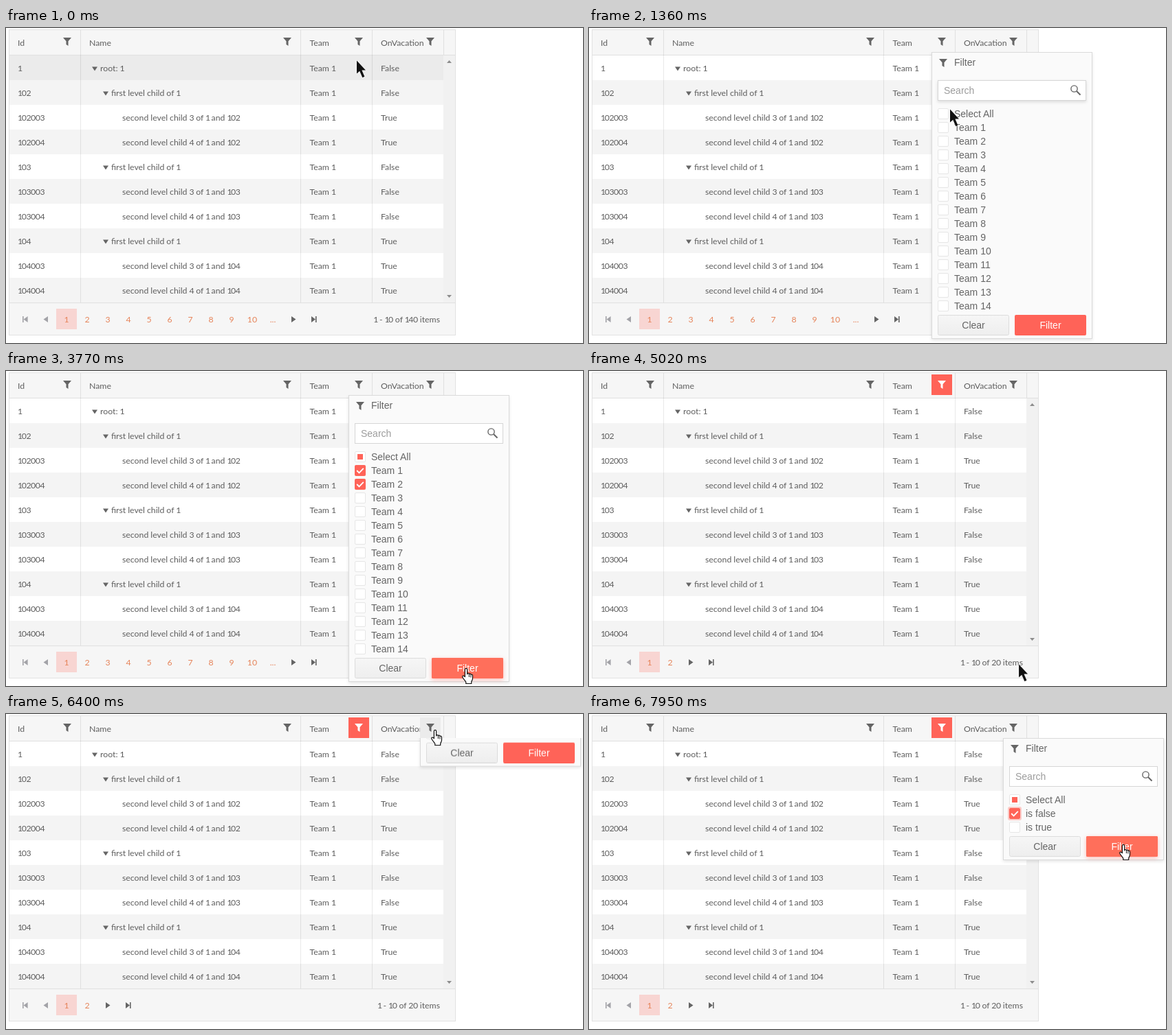
Recreate the animation shown at these times as an HTML page. Size 839 by 459 pixels, loop 8000 ms.

```html
<!DOCTYPE html>
<html lang="en">
<head>
<meta charset="utf-8">
<title>Tree list filtering</title>
<style>
  html, body { margin: 0; width: 100%; height: 100%; overflow: hidden; background: #fff; }
  svg { display: block; width: 839px; height: 459px; }
  text { font: 12.3px Lato, "Open Sans", sans-serif; fill: #5e5e5e; word-spacing: -.2px; }
  .digit { letter-spacing: -.4px; }
  .one { letter-spacing: -1.5px; }
  .ui tspan, .mid tspan { letter-spacing: 0; }
  .mid { text-anchor: middle; }
  .end { text-anchor: end; }
  .link { fill: #e6845a; }
  .ui text { font: 14px "Liberation Sans", Arial, sans-serif; fill: #656565; word-spacing: 0; }
  .ui .hint { fill: #9c9c9c; }
  .light, .ui .light { fill: #fff; }
  .icon { fill: #656565; }
  .off { fill: #a3a3a8; }
  .line { stroke: #000; stroke-opacity: .085; }
  .box { fill: #fff; stroke: #e6e6e6; }
  .red { fill: #ff6358; }
  .panel { fill: #fafafa; stroke: #dadada; filter: drop-shadow(0 2px 2px rgba(0,0,0,.1)); }
  .raised { filter: drop-shadow(0 2px 2px rgba(0,0,0,.12)); }
  .hot { fill: #ff6f5b; filter: drop-shadow(0 2px 3px rgba(255,99,88,.4)); }
  .ring { fill: none; stroke: #ff6358; stroke-opacity: .3; stroke-width: 2; }
</style>
</head>
<body>
<svg id="stage" viewBox="0 0 839 459" xmlns="http://www.w3.org/2000/svg"></svg>
<script>
const LOOP = 8000;
const css = [];

// Keyframes from [ms, declarations] pairs
function animate(id, frames, ease) {
  const body = frames.map(([t, rule]) => `${(t / LOOP * 100).toFixed(3)}%{${rule}}`).join('');
  css.push(`@keyframes ${id}{${body}}#${id}{animation:${id} ${LOOP}ms ${ease} infinite}`);
}

// Hard switch of visibility at each given time
function toggle(id, on, ...times) {
  const frames = [0, ...times].map((t, i) => [t, `opacity:${+(on === (i % 2 === 0))}`]);
  animate(id, frames, 'step-end');
}

const group = (id, body) => `<g id="${id}">${body}</g>`;
const rect = (x, y, w, h, attrs) => `<rect x="${x}" y="${y}" width="${w}" height="${h}" ${attrs}/>`;
const path = (d, attrs) => `<path d="${d}" ${attrs}/>`;
const funnel = (x, y, cls = 'icon') =>
  path(`M${x - 6} ${y - 6}h12l-4.5 5.3v6.7l-3-2v-4.7z`, `class="${cls}"`);

// Digits are set tighter than letters
function text(x, y, str, cls = '') {
  const body = String(str).replace(/\d/g, d => `<tspan class="${d === '1' ? 'one' : 'digit'}">${d}</tspan>`);
  return `<text x="${x}" y="${y}" class="${cls}">${body}</text>`;
}

function table() {
  let out = rect(4.5, 2.5, 649, 445, 'fill="#f6f6f6" stroke="#e2e2e2"');
  for (let i = 0; i < 10; i++) {
    out += rect(5, 40 + 36 * i, 631, 36, `fill="${i % 2 ? '#f4f4f4' : '#fff'}"`);
  }
  out += group('rowHover', rect(5, 40, 631, 36, 'fill="#ebebeb"'));
  out += rect(636, 40, 17, 360, 'fill="#f1f1f1"');
  out += path('M641 51l3.5-4 3.5 4zM641 389l3.5 4 3.5-4z', 'fill="#8c8c8c"');
  out += path('M5 39.5H653M5 400.5H653M108.5 3V400M428.5 3V400M532.5 3V400M636.5 3V39', 'class="line"');

  ['Id', 'Name', 'Team', 'OnVacation'].forEach((s, i) => {
    out += text([17, 121, 441.5, 545][i], 26, s);
  });

  const away = [0, 0, 1, 1, 0, 0, 0, 1, 1, 1];
  for (let i = 0; i < 10; i++) {
    const y = 63 + 36 * i;
    const parent = 102 + Math.floor((i - 1) / 3);
    const kind = (i - 1) % 3;
    let id = parent, name = 'first level child of 1', x = 153;
    if (!i) [id, name, x] = [1, 'root: 1', 137];
    else if (kind) {
      id = `${parent}00${kind + 2}`;
      name = `second level child ${kind + 2} of 1 and ${parent}`;
      x = 169;
    }
    if (x < 169) out += path(`M${x - 12} ${y - 6.5}h8l-4 6z`, 'class="icon"');
    out += text(17, y, id) + text(x, y, name)
      + text(441.5, y, 'Team 1') + text(545, y, away[i] ? 'True' : 'False');
  }

  out += group('iconHover1', rect(498, 5, 30, 30, 'fill="#ebebeb"'));
  out += group('iconHover2', rect(602, 5, 30, 30, 'fill="#ebebeb"'));
  out += [89, 409, 513, 617].map(x => funnel(x, 20)).join('');
  out += group('filtered', rect(498, 5, 30, 30, 'class="red"') + funnel(513, 20, 'light'));
  return out;
}

function pages(id, count, more, total) {
  let out = '';
  for (let n = 2; n <= count; n++) out += text(58 + 30 * n, 429, n, 'mid link');
  if (more) out += text(388, 429, '...', 'mid link');
  const x = 88 + 30 * (count + more);
  out += path(`M${x - 3} 420v9l6.5-4.5zM${x + 26} 420v9l6-4.5zM${x + 32} 420h1.6v9h-1.6z`, 'class="icon"');
  return group(id, out + text(631, 429, `1 - 10 of ${total} items`, 'end'));
}

function pager() {
  return path('M24 420h1.6v9h-1.6zM31.6 420v9l-6-4.5zM61 420v9l-6.5-4.5z', 'class="off"')
    + rect(73, 409, 30, 30, 'fill="#f8d5d2"') + text(88, 429, 1, 'mid link')
    + pages('allPages', 10, 1, 140) + pages('fewPages', 2, 0, 20);
}

// checked: number of items, after the first, that get ticked
function popup(id, x, labels, checked) {
  const foot = 118 + 20 * labels.length;
  let out = rect(x + .5, 35.5, 233, foot - 1, 'class="panel"');
  out += funnel(x + 17, 51) + text(x + 33, 55, 'Filter');
  out += group(id + 'Focus', rect(x + 9, 76, 216, 30, 'class="raised" fill="#fff"'));
  out += rect(x + 9.5, 76.5, 215, 29, 'fill="#fff" stroke="#d6d6d6"') + text(x + 18, 96, 'Search', 'hint');
  out += `<circle cx="${x + 207.5}" cy="88.5" r="4.6" fill="none" stroke="#656565" stroke-width="1.4"/>`;
  out += path(`M${x + 211} 92l5.5 5.5`, 'stroke="#656565" stroke-width="2"');

  labels.forEach((label, i) => {
    const left = x + 9, top = 117 + 20 * i;
    out += rect(left + .5, top + .5, 15, 15, 'class="box" rx="1.5"') + text(x + 33, top + 13, label);
    if (!i) out += group(id + 'Some', rect(left + 4, top + 4, 8, 8, 'class="red"'));
    else if (i <= checked) {
      out += group(id + 'Tick' + i, rect(left, top, 16, 16, 'class="red" rx="2"')
        + path(`M${left + 3.2} ${top + 8}l3.3 3.4 6.3-6.6`, 'fill="none" stroke="#fff" stroke-width="1.8"'));
    }
  });
  const last = 117 + 20 * checked;
  out += group(id + 'Ring', rect(x + 8, last - 1, 18, 18, 'class="ring" rx="2"'));

  out += rect(x + 9.5, foot + .5, 103, 29, 'fill="url(#grey)" stroke="#dcdcdc" rx="2"') + text(x + 61, foot + 20, 'Clear', 'mid');
  out += rect(x + 121, foot, 104, 30, 'class="red" rx="2"');
  out += group(id + 'Hot', rect(x + 121, foot, 104, 30, 'class="hot" rx="2"'));
  out += text(x + 173, foot + 20, 'Filter', 'mid light');
  return `<g clip-path="url(#below)" class="ui">${group(id, group(id + 'Slide', out))}</g>`;
}

function cursor() {
  return group('cursor',
    group('arrow', path('M0-.5V18.6L4.2 14.8 8.3 24.2 11.4 22.8 7.4 13.6H13Z',
      'fill="#111" stroke="#fff" paint-order="stroke"'))
    + group('hand', path('M-1.6 12.5V2a1.6 1.6 0 0 1 3.2 0V8.2c.6-1 2.6-.8 2.8.4.7-.8 2.3-.6 2.5.7.9-.6 2.6 0 2.6 1.6V15c0 2-1.3 3.6-1.8 5V22.5H-.2V20.3C-1.4 18.3-4 15.6-5.2 13c-.7-1.7 1.2-2.5 2.2-1.4z',
      'fill="#fff" stroke="#111" stroke-width="1.2"')
      + path('M4.4 9v4M6.9 10v3.5', 'stroke="#111"')));
}

const teams = Array.from({ length: 14 }, (_, i) => `Team ${i + 1}`);
document.getElementById('stage').innerHTML = `<defs>
  <clipPath id="below"><rect y="35" width="839" height="424"/></clipPath>
  <linearGradient id="grey" x2="0" y2="1"><stop stop-color="#f6f6f6"/><stop offset="1" stop-color="#eee"/></linearGradient>
</defs>` + table() + pager()
  + popup('team', 498, ['Select All', ...teams], 2)
  + popup('leave', 602, ['Select All', 'is false', 'is true'], 1)
  + cursor();

// Table state
const row = (t, i) => [t, i < 0 ? 'opacity:0' : `opacity:1;transform:translateY(${36 * i}px)`];
animate('rowHover', [
  row(0, 0), row(220, -1), row(5480, 9), row(5560, 7), row(5640, 4),
  row(5720, 2), row(5800, 1), row(5940, 0), row(6090, -1), row(8000, -1)
], 'step-end');
toggle('iconHover1', false, 300, 1130);
toggle('iconHover2', false, 6170, 6720);
toggle('filtered', false, 3930);
toggle('allPages', true, 3930);
toggle('fewPages', false, 3930);

// Team popup
const slide = y => `transform:translateY(${y}px)`;
toggle('team', false, 670, 4010);
animate('teamSlide', [
  [0, slide(-418)], [655, slide(-418)], [960, slide(0)],
  [3860, slide(0)], [4010, slide(-418)], [8000, slide(-418)]
], 'linear');
toggle('teamFocus', true, 2050);
toggle('teamTick1', false, 1820);
toggle('teamSome', false, 2050);
toggle('teamTick2', false, 2430);
toggle('teamRing', false, 2430, 2680);
toggle('teamHot', false, 3390);

// Vacation popup
toggle('leave', false, 6330);
animate('leaveSlide', [
  [0, slide(-178)], [6330, slide(-178)], [6634, slide(0)], [8000, slide(0)]
], 'linear');
toggle('leaveFocus', true, 7250);
toggle('leaveTick1', false, 7250);
toggle('leaveSome', false, 7320);
toggle('leaveRing', false, 7320);
toggle('leaveHot', false, 7870);

// Pointer
const shape = [300, 1130, 1600, 2760, 3390, 3950, 6170, 6720, 7060, 7660, 7870];
toggle('hand', false, ...shape);
toggle('arrow', true, ...shape);
const at = (t, x, y, ease = 'ease-in-out') =>
  [t, `transform:translate(${x}px,${y}px);animation-timing-function:${ease}`];
animate('cursor', [
  at(0, 510, 48), at(510, 512, 21), at(1060, 512, 21), at(1350, 525, 119),
  at(1430, 525, 119), at(1670, 524, 140), at(1980, 524, 140), at(2350, 526, 166),
  at(2610, 526, 166), at(3470, 669, 433), at(3860, 669, 433), at(3950, 667, 432),
  at(4400, 667, 432), at(4700, 580, 432), at(4795, 580, 432), at(5010, 625, 428),
  at(5100, 626, 428), at(5330, 620, 425), at(5410, 620, 425, 'linear'),
  at(5480, 612, 395, 'linear'), at(5560, 598, 300, 'linear'), at(5640, 586, 200, 'linear'),
  at(5720, 581, 125, 'linear'), at(5770, 581, 122, 'linear'), at(5940, 596, 75, 'linear'),
  at(6110, 616, 34, 'ease-out'), at(6250, 624, 23), at(6640, 624, 23),
  at(7100, 637, 146), at(7500, 637, 146), at(7940, 777, 190), at(8000, 777, 190)
], 'linear');

const sheet = document.createElement('style');
sheet.textContent = css.join('\n');
document.head.append(sheet);
</script>
</body>
</html>
```
